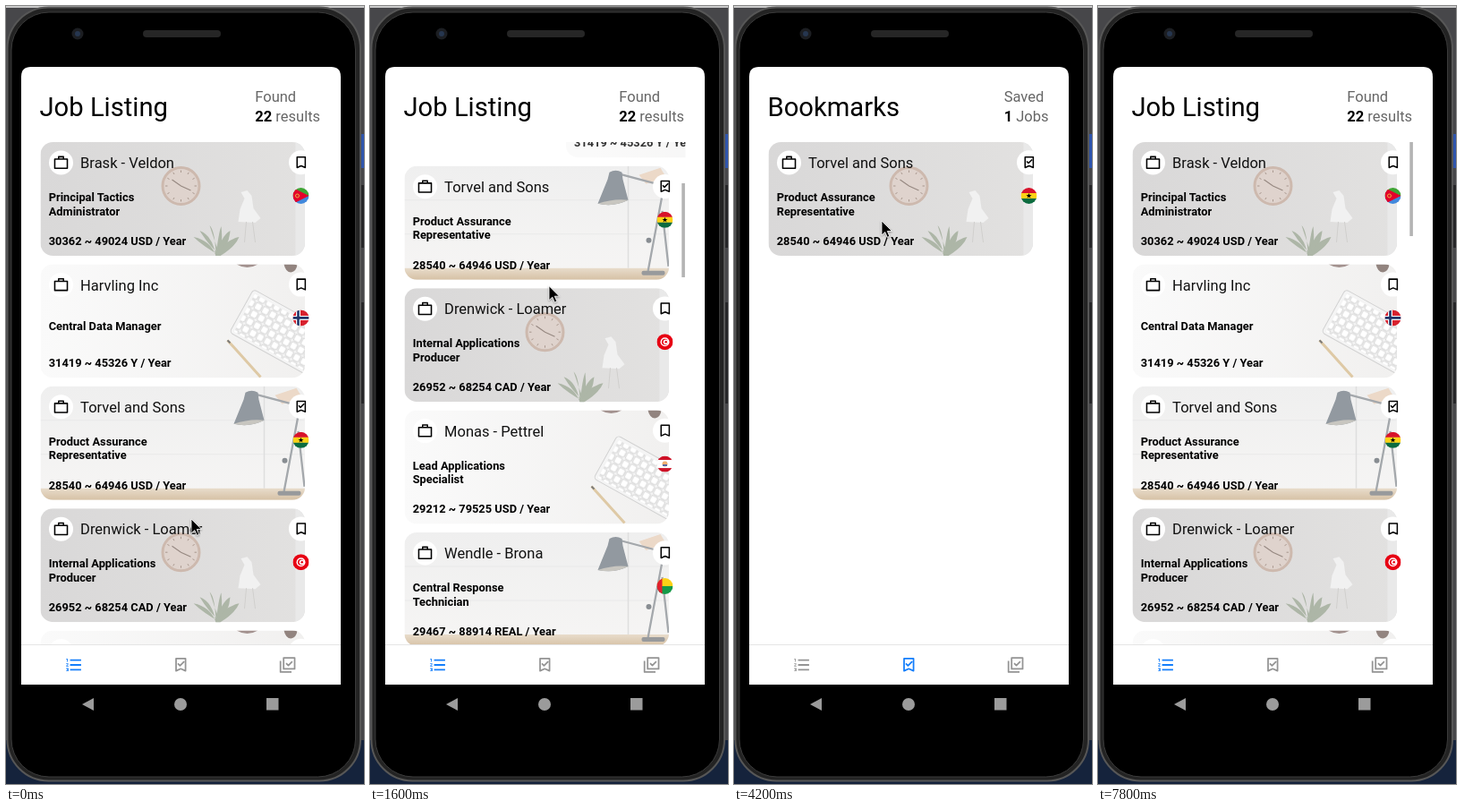
An HTML page for the animation above (7900 ms loop, 400 by 869 pixels).

```html
<!DOCTYPE html>
<html lang="en">
<head>
<meta charset="utf-8">
<title>Job list</title>
<style>
html, body { margin: 0; height: 100%; overflow: hidden; background: #000; }
svg { display: block; width: 100vw; height: 100vh; font: 16.5px Roboto, sans-serif; }
.title { font-size: 29.2px; }
.bold { font-weight: 700; }
.job { font-weight: 700; font-size: 12.85px; }
.empty { font-size: 18.1px; fill: #333; }
.line { fill: none; stroke: currentColor; stroke-width: 2; stroke-linejoin: round; }
</style>
</head>
<body>
<svg id="stage" viewBox="0 0 400 869"></svg>
<script>
const PITCH = 136.4, LOOP = 7900;

const jobs = [
  ['Brask - Veldon', 'Principal Tactics|Administrator', '30362 ~ 49024 USD / Year', 'eritrea'],
  ['Harvling Inc', 'Central Data Manager', '31419 ~ 45326 Y / Year', 'norway'],
  ['Torvel and Sons', 'Product Assurance|Representative', '28540 ~ 64946 USD / Year', 'ghana', true],
  ['Drenwick - Loamer', 'Internal Applications|Producer', '26952 ~ 68254 CAD / Year', 'tunisia'],
  ['Monas - Pettrel', 'Lead Applications|Specialist', '29212 ~ 79525 USD / Year', 'polynesia'],
  ['Wendle - Brona', 'Central Response|Technician', '29467 ~ 88914 REAL / Year', 'benin'],
];

const rect = (x, y, w, h, fill, more = '') =>
  `<rect x="${x}" y="${y}" width="${w}" height="${h}" fill="${fill}" ${more}/>`;
const circle = (x, y, r, fill, more = '') =>
  `<circle cx="${x}" cy="${y}" r="${r}" fill="${fill}" ${more}/>`;
const path = (d, fill, more = '') => `<path d="${d}" fill="${fill}" ${more}/>`;
const line = (d, color, width) => path(d, 'none', `stroke="${color}" stroke-width="${width}"`);
const text = (x, y, s, cls = '', fill = '#000') =>
  `<text x="${x}" y="${y}" class="${cls}" fill="${fill}">${s}</text>`;
const icon = (name, x, y, scale) =>
  `<g transform="translate(${x} ${y}) scale(${scale}) translate(-12 -12)">${icons[name]}</g>`;

const outline = d => `<path class="line" d="${d}"/>`;
const mark = 'M6 4H18V19.5L12 16.9L6 19.5Z';
const icons = {
  list: path('M7 13V11H21V13H7M7 19V17H21V19H7M7 7V5H21V7H7M3 8V5H2V4H4V8H3M2 17V16H5V20H2V19H4V18.5H3V17.5H4V17H2' +
    'M4.25 10A.75 .75 0 0 1 5 10.75C5 10.95 4.92 11.14 4.79 11.27L3.12 13H5V14H2V13.08L4 11H2V10H4.25Z', 'currentColor'),
  mark: outline(mark),
  marked: outline(mark + 'M8.2 10.2L11 13L16.3 7.7'),
  checks: outline('M7 3H21V17H7ZM3 7V21H17M10.2 9.8L13 12.6L18 7.6'),
  work: outline('M3 7.5H21V20.5H3ZM8.5 7V4H15.5V7'),
};

// Flags sit in a circle of radius 9 around the origin.
const bands = (...colors) => colors.map((c, i) =>
  rect(-9, -9 + i * 18 / colors.length, 18, 18 / colors.length + .1, c)).join('');
const flags = {
  eritrea: bands('#3fa535', '#4189dd') + path('M-9 -9L9 0L-9 9Z', '#e4002b') + circle(-4, 0, 2, 'none', 'stroke="#e8b33c"'),
  norway: bands('#d8222f') + line('M-3 -9V9M-9 0H9', '#fff', 5) + line('M-3 -9V9M-9 0H9', '#1f3468', 2.6),
  ghana: bands('#d8122b', '#fcd116', '#0b6b3f') + path('M0 -3L.8 -.9H3L1.2 .4L1.9 2.6L0 1.3L-1.9 2.6L-1.2 .4L-3 -.9H-.8Z', '#000'),
  tunisia: bands('#e70013') + circle(0, 0, 5, '#fff') + circle(0, 0, 3.5, '#e70013') + circle(1, 0, 2.8, '#fff') + circle(1.2, 0, 1.3, '#e70013'),
  polynesia: bands('#ce1126', '#fff', '#fff', '#ce1126') + circle(0, 0, 3, '#f0b070') + rect(-2.5, .5, 5, 1.8, '#4a62a8'),
  benin: bands('#fcd116', '#159a48') + rect(-9, -9, 6, 18, '#e0202e'),
};

const wall = (name, right = '') => rect(0, 0, 295.5, 127, `url(#${name})`) + right;
const leaves = [[-27, -18], [-20, -25], [-9, -31], [4, -30], [14, -25], [24, -18]];
const ticks = [...Array(12).keys()].map(i => {
  const a = i * Math.PI / 6, s = Math.sin(a), c = Math.cos(a);
  return `M${157 + 15 * s} ${49 + 15 * c}l${2.5 * s} ${2.5 * c}`;
}).join('');
const scenes = [
  wall('gray', rect(285, 0, 10.5, 127, '#e9e9e9')) +
    circle(157, 49, 20.5, '#dfd3cd', 'stroke="#cdb9ae" stroke-width="3"') +
    line(ticks, '#a9988f', 1) + line('M147 42L157 49L168 54', '#978982', 1.2) +
    path('M224 56L231 54L236 60L238 74L246 85L240 90L221 89L223 75L228 63Z', '#f1f1f1') +
    line('M230 89L228 112M237 89L240 112', '#d0cfcd', 1) +
    leaves.map(([x, y]) => path(`M196 127Q${198 + x * .3} ${124 + y * .8} ${198 + x} ${124 + y}Q${201 + x * .7} ${124 + y * .4} 201 127Z`, '#adb6a7')).join(''),
  wall('white') +
    path('M219 0Q231 7 243 0Z', '#a3928f') + path('M272 0Q274 9 280 9Q286 8 287 0Z', '#92847f') +
    `<g transform="translate(238 28) rotate(29)">${rect(0, 0, 110, 55, '#f4f4f4', 'rx="4" stroke="#d2d2d2"')}${rect(4, 4, 102, 48, 'url(#keys)')}</g>` +
    line('M209 85L246 126', '#dec9a5', 3) + line('M209 85l3 3', '#777', 2),
  wall('pale') + line('M0 38H295M0 76H295', '#e9e9e9', 1) +
    line('M250 0V114', '#dedede', 1.5) + path('M262 10L286 2L292 12L270 20Z', '#ecd9c8') +
    rect(0, 114, 295.5, 13, 'url(#wood)') +
    line('M241 9L290 22L272 118M288 50L295 112', '#a4a8ac', 2.3) + circle(273, 83, 3, '#888d92') +
    rect(265, 117, 26, 5, '#989a9c', 'rx="2"') +
    path('M229 7Q236 3 243 7L244 15L250 38Q234 46 216 42L227 15Z', '#9299a0') + path('M216 42Q234 36 250 38Q234 46 216 42Z', '#c8c6c0'),
];

function card([name, title, pay, flag, saved], i) {
  const rows = title.split('|');
  const top = rows.length > 1 ? 66.3 : 73.8;
  return `<g class="card"><g clip-path="url(#card)">${scenes[i % 3]}</g>` +
    circle(23, 23, 13.5, '#fff') + icon('work', 23, 22.6, .78) +
    circle(291, 22.7, 13.5, '#fff') + icon(saved ? 'marked' : 'mark', 291.3, 22.8, .76) +
    `<g transform="translate(291 60)" clip-path="url(#flag)">${flags[flag]}</g>` +
    text(44.6, 29.3, name, '', '#111') +
    rows.map((r, k) => text(9.2, top + k * 15.4, r, 'job')).join('') +
    text(9.2, 114.8, pay, 'job') + '</g>';
}

const page = (title, x, label, count, unit, body) => `<g class="page">
  ${text(37.5, 123.3, title, 'title')}${text(x, 107.3, label, '', '#666')}
  <text x="${x}" y="129.3" fill="#666"><tspan class="bold" fill="#000">${count}</tspan> ${unit}</text>${body}</g>`;

const gradient = (id, a, b, dir = '') =>
  `<linearGradient id="${id}" ${dir}><stop stop-color="${a}"/><stop offset="1" stop-color="${b}"/></linearGradient>`;
const down = 'x2="0" y2="1"';

const box = 'M195.5 339L271 381L195.5 425L120 381ZL90 351L165 308L195.5 339L226 308L301 351L271 381L301 412L226 455L195.5 425' +
  'L165 455L90 412L120 381M120 428V468L195.5 512L271 468V428M195.5 425V512';
const floppy = path('M236 571H252L255 574V591H236Q234.500 591 234.500 589V573Q234.500 571 236 571Z', '#4d5a64') +
  rect(238.5, 571, 12, 7, '#b9c3ca') + rect(246, 572, 3, 5, '#4d5a64') + rect(237.5, 581, 14.5, 10, '#eef1f3') +
  line('M239 584H250M239 587H250', '#9aa6ae', 1);

stage.innerHTML = `<defs>
  ${gradient('gray', '#d9d8d8', '#e2e1e0')}${gradient('white', '#fafafa', '#f1f0ef')}
  ${gradient('pale', '#efefef', '#f6f5f4', down)}${gradient('wood', '#e8dccb', '#d6c1a5', down)}
  <pattern id="keys" width="9.3" height="9.6" patternUnits="userSpaceOnUse">${rect(1, 1, 7.6, 7.8, '#fff', 'rx="1.5" stroke="#d4d4d4"')}</pattern>
  <clipPath id="card">${rect(0, 0, 295.5, 127, '#000', 'rx="14"')}</clipPath>
  <clipPath id="flag">${circle(0, 0, 9, '#000')}</clipPath>
  <clipPath id="view">${rect(38, 152, 314.5, 561.5, '#000')}</clipPath>
  <filter id="soft" x="-1" y="-1" width="3" height="3"><feDropShadow dx="0" dy="1" stdDeviation="1.3" flood-opacity=".4"/></filter>
</defs>
${rect(0, 0, 400, 869, '#47474a') + rect(0, 0, 400, 2, '#c9c9c9') + rect(397, 143, 3, 38, '#2f55ad') + rect(396, 200, 4, 70, '#262628') +
  rect(396, 331, 4, 113, '#262628') + rect(0, 820, 400, 49, '#15233c')}
${rect(1.5, 1.5, 394.5, 864, '#232323', 'rx="46" stroke="#575757" stroke-width="2"')}
${rect(6, 7, 384.5, 854, '#000', 'rx="42" stroke="#3b3b3b"')}
${circle(80, 31, 6.5, '#1c1e22') + circle(80, 31, 3, '#26364f') + rect(153, 27, 87, 8, '#262626', 'rx="4"')}
${path('M17 758V79Q17 68 28 68H363Q374 68 374 79V758Z', '#fff')}
${path('M85 780L98 773V787Z', '#9b9b9b') + circle(195, 780, 7, '#9b9b9b') + rect(291, 773, 13.500, 13.500, '#9b9b9b')}
${page('Job Listing', 278.3, 'Found', 22, 'results', `<g clip-path="url(#view)"><g id="list">${jobs.map(card).join('')}</g></g>` +
  rect(348.3, 152, 3.6, 105, '#b4b4b4', 'id="bar"'))}
${page('Bookmarks', 301.7, 'Saved', 1, 'Jobs', `<g transform="translate(38.5 152)">${card(jobs[2], 0)}</g>`)}
${page('My Jobs', 301.7, 'Saved', 0, 'Jobs',
  `<path id="box" d="${box}" fill="none" stroke="#000" stroke-width="8" stroke-linejoin="round" stroke-linecap="round"/>` +
  text(50, 566, 'UPS, nothing to show !, add items to', 'empty') + text(135, 587, 'show them.', 'empty') + floppy)}
${line('M17 713.5H374', '#e5e5e5', 1)}
${['list', 'marked', 'checks'].map((n, i) => `<g class="tab">${icon(n, 76 + i * 119.3, 736, .88)}</g>`).join('')}
<path id="cursor" d="M0 0V16L3.800 12.500L6.300 18.300L8.800 17.200L6.300 11.500H11.500Z" stroke="#fff" stroke-width=".8" filter="url(#soft)"/>`;

const all = sel => [...stage.querySelectorAll(sel)];
const pages = all('.page'), tabs = all('.tab'), cards = all('#list .card');
const $ = id => document.getElementById(id);
const list = $('list'), bar = $('bar'), art = $('box'), cursor = $('cursor');

const drag = [[0, 0], [95, 0], [500, 83], [1200, 225], [1500, 246]];
const glide = [[0, 207, 573], [500, 205, 471], [1200, 200, 329], [1500, 199, 307], [2100, 205, 341]];
const jumps = [[3300, 201, 560], [3400, 193, 732], [3900, 199, 685], [4200, 165, 240], [4500, 180, 267], [4700, 190, 716],
  [4900, 217, 716], [5200, 312, 735], [5700, 308, 617], [5900, 188, 320], [6200, 100, 658], [6500, 79, 728],
  [6700, 79, 731], [7000, 81, 726], [7300, 92, 50], [7500, 87, 0]];

function at(keys, t) {
  const i = keys.findIndex(k => k[0] > t);
  if (i < 0) return keys.at(-1).slice(1);
  const a = keys[i - 1], b = keys[i], f = (t - a[0]) / (b[0] - a[0]);
  return a.slice(1).map((v, k) => v + (b[k + 1] - v) * f);
}

function draw(t) {
  const open = t >= 3700 && t < 5400 ? 1 : t >= 5400 && t < 7000 ? 2 : 0;
  pages.forEach((p, i) => p.style.display = i === open ? '' : 'none');
  tabs.forEach((p, i) => p.style.color = i === open ? '#147efb' : '#949494');

  const scroll = t < 7000 ? at(drag, t)[0] : 0;
  list.setAttribute('transform', `translate(38.5 ${152 - scroll})`);
  cards.forEach((c, i) => {
    const past = Math.max(0, scroll - i * PITCH);
    c.setAttribute('transform', `translate(${past * 1.645} ${i * PITCH})`);
    c.style.opacity = Math.max(0, 1 - past * .0018);
  });
  bar.setAttribute('y', 152 + scroll * .187);
  bar.style.opacity = t < 100 ? 0 : t >= 7000 ? 1 : Math.max(0, Math.min(1, (2400 - t) / 300));
  art.style.display = t < 5700 ? 'none' : '';

  const [x, y] = t < 3300 ? at(glide, t) : jumps.findLast(k => k[0] <= t).slice(1);
  cursor.setAttribute('transform', `translate(${x} ${y})`);
  cursor.style.display = t < 7800 ? '' : 'none';
}

const start = performance.now();
function tick() {
  const t = (performance.now() - start) % LOOP;
  draw(Math.floor(t / 100) * 100);
  requestAnimationFrame(tick);
}
tick();
</script>
</body>
</html>
```
